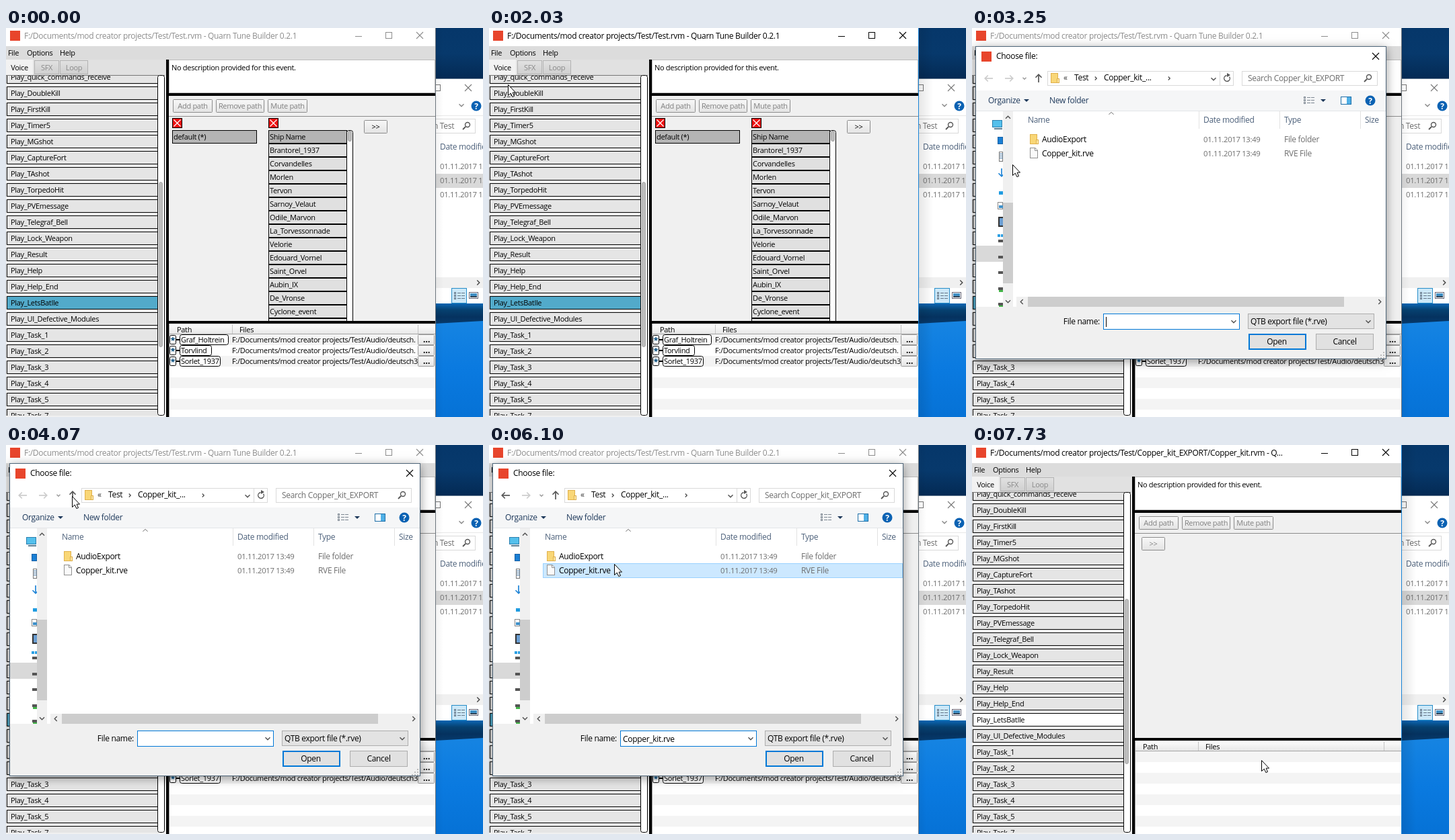
These frames come from a looping animation (709 px wide and 579 px high, 8000 ms). An HTML page with a canvas:

```html
<!DOCTYPE html>
<html lang="en">
<head>
<meta charset="utf-8">
<title>Choose file</title>
<style>
html, body { margin: 0; width: 100%; height: 100%; overflow: hidden; background: #fff; }
canvas { display: block; }
</style>
</head>
<body>
<canvas id="stage" width="709" height="579"></canvas>
<script>
const ctx = document.getElementById('stage').getContext('2d');
const LOOP = 8000;
const FONT = '"Open Sans", "Noto Sans", sans-serif';

// Pointer positions: time, x, y
const POINTER = [
  [200, 446, 513], [400, 398, 440], [610, 286, 308], [810, 150, 176],
  [1020, 60, 90], [1220, 18, 48], [1420, 14, 39], [1830, 28, 84],
  [2040, 46, 142], [2240, 57, 186], [2440, 60, 203], [3460, 66, 168],
  [3660, 82, 116], [3870, 95, 82], [4070, 98, 76], [4480, 128, 106],
  [4690, 170, 158], [4900, 186, 177], [6500, 192, 184], [6720, 250, 260],
  [6920, 344, 380], [7120, 422, 462], [7310, 430, 469]
];
const EVENTS = ['quick_commands_receive', 'DoubleKill', 'FirstKill', 'Timer5', 'MGshot',
  'CaptureFort', 'TAshot', 'TorpedoHit', 'PVEmessage', 'Telegraf_Bell', 'Lock_Weapon',
  'Result', 'Help', 'Help_End', 'LetsBatlle', 'UI_Defective_Modules', 'Task_1', 'Task_2',
  'Task_3', 'Task_4', 'Task_5', 'Task_7'];
const SHIPS = ['Ship Name', 'Brantorel_1937', 'Corvandelles', 'Morlen', 'Tervon',
  'Sarnoy_Velaut', 'Odile_Marvon', 'La_Torvessonnade', 'Velorie', 'Edouard_Vornel',
  'Saint_Orvel', 'Aubin_IX', 'De_Vronse', 'Cyclone_event', 'Cyclone_event'];
const PATHS = [['Graf_Holtrein', 73, '.'], ['Torvlind', 48, '.'], ['Sorlet_1937', 61, '3']];
const ROOT = 'F:/Documents/mod creator projects/Test/';
const KIT = 'Copper_kit';
const APP = 'Quarn Tune Builder';

function rect(x, y, w, h, fill, stroke) {
  if (fill) { ctx.fillStyle = fill; ctx.fillRect(x, y, w, h); }
  if (stroke) {
    ctx.strokeStyle = stroke;
    ctx.lineWidth = 1;
    ctx.strokeRect(x + .5, y + .5, w - 1, h - 1);
  }
}

function round(x, y, w, h, r, fill, stroke) {
  ctx.beginPath();
  ctx.roundRect(x + .5, y + .5, w - 1, h - 1, r);
  if (fill) { ctx.fillStyle = fill; ctx.fill(); }
  if (stroke) { ctx.strokeStyle = stroke; ctx.lineWidth = 1; ctx.stroke(); }
}

function line(points, color, width = 1) {
  ctx.beginPath();
  for (let i = 0; i < points.length; i += 2) ctx.lineTo(points[i], points[i + 1]);
  ctx.strokeStyle = color;
  ctx.lineWidth = width;
  ctx.stroke();
}

function poly(points, fill) {
  ctx.beginPath();
  for (let i = 0; i < points.length; i += 2) ctx.lineTo(points[i], points[i + 1]);
  ctx.closePath();
  ctx.fillStyle = fill;
  ctx.fill();
}

function text(s, x, y, color = '#000', size = 12, align = 'left', weight = 400) {
  ctx.font = `${weight} ${size}px ${FONT}`;
  ctx.letterSpacing = '-0.31px';
  ctx.textAlign = align;
  ctx.fillStyle = color;
  ctx.fillText(s, x, y + 4);
}
const small = (s, x, y, color, align) => text(s, x, y, color, 11, align, 500);
const date = (min, x, y) => text('01.11.2017 13:' + min, x, y, '#6d6d6d', 11.3);

function clip(x, y, w, h, draw) {
  ctx.save();
  ctx.beginPath();
  ctx.rect(x, y, w, h);
  ctx.clip();
  draw();
  ctx.restore();
}

function fade(y0, y1, ...colors) {
  const g = ctx.createLinearGradient(0, y0, 0, y1);
  colors.forEach((c, i) => g.addColorStop(i / (colors.length - 1), c));
  return g;
}

// Chevron pointing along (dx, dy)
function chevron(x, y, dx, dy, color = '#505050', s = 3.5, w = 1.4) {
  const px = dy * s, py = dx * s, hx = dx * s / 2, hy = dy * s / 2;
  line([x - hx - px, y - hy - py, x + hx, y + hy, x - hx + px, y - hy + py], color, w);
}

function cross(x, y, r, color, w = 1.1) {
  line([x - r, y - r, x + r, y + r], color, w);
  line([x - r, y + r, x + r, y - r], color, w);
}

function arrow(x, y, dx, dy, color) {
  line([x - dx * 6, y - dy * 6, x + dx * 5.5, y + dy * 5.5], color, 1.7);
  chevron(x + dx * 3.5, y + dy * 3.5, dx, dy, color, 4.5, 1.7);
}

function lens(x, y) {
  ctx.beginPath();
  ctx.arc(x + 2, y - 2, 3.5, 0, 7);
  ctx.strokeStyle = '#555';
  ctx.lineWidth = 1.4;
  ctx.stroke();
  line([x - 1, y + 1, x - 5, y + 5], '#555', 1.8);
}

function help(x, y) {
  ctx.beginPath();
  ctx.arc(x, y, 7.5, 0, 7);
  ctx.fillStyle = '#0b62b3';
  ctx.fill();
  text('?', x, y + .5, '#fff', 12, 'center', 700);
}

function bars(x, y, color) {
  for (let i = 0; i < 3; i++) {
    rect(x, y + i * 4, 3, 3, null, color);
    rect(x + 5, y + 1 + i * 4, 5, 1, color);
    rect(x + 11, y + 1 + i * 4, 5, 1, color);
  }
}

function drawDesktop(active) {
  rect(638, 0, 71, 75, fade(0, 75, '#06376a', '#07396c', '#042a54'));
  rect(638, 410, 71, 30, fade(410, 440, '#0a66b4', '#06406f', '#05325f', '#063a6c'));
  poly([638, 440, 709, 436, 709, 579, 638, 579], fade(436, 579, '#1684e2', '#0a7ae0', '#0672d6'));
  rect(638, 75, 71, 335, '#fff');
  rect(638, 75, 71, 1, '#6b7f94');
  rect(632, 84, 14, 10, null, '#777');
  cross(687, 89, 5, '#777');
  chevron(677, 115, 0, 1, '#888');
  help(699, 116);
  rect(638, 130, 71, 1, '#e8e8e8');
  rect(630, 135, 68, 22, '#fff', '#d9d9d9');
  text('n Test', 635, 146, '#6d6d6d');
  lens(684, 146);
  text('Date modified', 645, 177, '#4c607a');
  rect(638, 217, 71, 21, '#d9d9d9');
  [206, 227, 248].forEach(y => date('49', 645, y));
  rect(638, 371, 71, 16, '#f0f0f0');
  chevron(702, 379, 1, 0, '#444');
  rect(662, 387, 23, 23, '#cce8f8', '#268dc8');
  bars(666, 393, '#667788');
  rect(688, 393, 14, 10, '#fff', '#667');
  rect(690, 395, 10, 6, '#3f8fc4');
  rect(690, 399, 10, 2, '#345');
  const w = active ? 22 : 12;
  const g = ctx.createLinearGradient(638, 0, 638 + w, 0);
  g.addColorStop(0, active ? 'rgba(0,0,0,.1)' : 'rgba(0,0,0,.05)');
  g.addColorStop(1, 'rgba(0,0,0,0)');
  rect(638, 0, w, 579, g);
  rect(638, 0, 1, 579, active ? '#1883d7' : '#6c757d');
}

function button(s, x, y, w, color = '#808080') {
  round(x, y, w, 20, 1, fade(y, y + 20, '#f8f8f8', '#e3e3e3'), '#8c8c8c');
  small(s, x + w / 2, y + 10, color, 'center');
}

function drawEvents(loaded) {
  clip(0, 71, 238, 506, () => {
    EVENTS.forEach((name, i) => {
      const y = 63 + i * 24;
      const fill = i === 14 ? (loaded ? '#fff' : '#52aaca') : '#e5e5e5';
      rect(1, y, 226, 20, fill, '#000');
      small('Play_' + name, 7, y + 10);
    });
  });
  rect(225, 71, 13, 508, '#f0f0f0');
  round(225, 70, 11, 507, 3, '#fff', '#000');
  round(227, 229, 6, 246, 3, '#bdbdbd', '#a9a9a9');
}

function redCross(x) {
  rect(x, 134, 15, 15, '#e11', '#000');
  cross(x + 7.5, 141.5, 5, '#fff', 1.3);
}

function drawShips() {
  redCross(247);
  redCross(390);
  rect(247, 152, 126, 20, '#b4b4b4', '#000');
  small('default (*)', 249, 162);
  clip(390, 152, 126, 284, () => {
    SHIPS.forEach((name, i) => {
      const y = 152 + i * 20;
      rect(390, y, 117, 20, i ? '#e0e0e0' : '#b4b4b4', '#000');
      small(name, 392, y + 10);
    });
    round(506, 152, 10, 300, 3, '#fff', '#000');
    round(508, 153, 6, 16, 3, '#bdbdbd', '#a0a0a0');
  });
}

function drawPaths(loaded) {
  rect(242, 440, 396, 16, fade(440, 456, '#fff', '#e6e6e6'));
  rect(242, 455, 396, 1, '#a5a5a5');
  [336, 612].forEach(x => rect(x, 441, 1, 14, '#c4c4c4'));
  small('Path', 254, 449);
  small('Files', 347, 449);
  for (let y = 456, i = 0; y < 579; y += 16, i++) rect(242, y, 396, 16, i % 2 ? '#fff' : '#f4f4f4');
  rect(242, 440, 1, 139, '#999');
  if (loaded) return;
  PATHS.forEach(([name, w, end], i) => {
    const y = 456 + i * 16;
    round(243, y + 1, 10, 14, 2, '#fff', '#000');
    text('*', 248, y + 10, '#024a7a', 13, 'center', 700);
    rect(253, y + 7, 5, 2, '#000');
    round(258, y, w, 16, 3, '#fff', '#000');
    small(name, 260, y + 8);
    clip(336, y, 276, 16, () => small(ROOT + 'Audio/deutsch' + end, 336, y + 8));
    round(612, y, 25, 16, 1, fade(y, y + 16, '#fafafa', '#e4e4e4'), '#999');
    text('...', 625, y + 8, '#000', 14, 'center', 600);
  });
}

function drawMain({ active, loaded }) {
  const ink = active ? '#000' : '#8d8d8d';
  rect(0, 0, 638, 579, '#f0f0f0');
  rect(0, 0, 638, 27, '#fff');
  rect(6, 4, 15, 15, '#e8452c');
  text(loaded ? `${ROOT}${KIT}_EXPORT/${KIT}.rvm - Q...` : `${ROOT}Test.rvm - ${APP} 0.2.1`, 27, 12, ink);
  rect(519, 12, 10, 1, ink);
  rect(564, 6, 10, 10, null, ink);
  cross(615, 11, 5, ink);
  rect(0, 27, 638, 20, '#dcdcdc');
  small('File', 3, 37);
  small('Options', 31, 37);
  small('Help', 80, 37);

  rect(0, 47, 238, 24, '#e1e1e1');
  rect(0, 47, 40, 24, '#f2f2f2');
  small('Voice', 20, 59, '#000', 'center');
  [['SFX', 42, 37], ['Loop', 80, 42]].forEach(([s, x, w]) => {
    rect(x, 48, w, 21, fade(48, 69, '#e2e2e2', '#cfcfcf'), '#b2b2b2');
    small(s, x + w / 2, 59, '#8a8a8a', 'center');
  });
  rect(0, 70, 236, 1, '#777');
  drawEvents(loaded);

  rect(242, 47, 396, 50, '#fff', '#bbb');
  small('No description provided for this event.', 246, 59);
  button('Add path', 248, 106, 59);
  button('Remove path', 312, 106, 72);
  button('Mute path', 389, 106, 59);
  rect(242, 131, 396, 1, '#8c8c8c');
  if (loaded) {
    button('>>', 252, 137, 35);
  } else {
    button('>>', 532, 137, 35, '#000');
    drawShips();
  }
  drawPaths(loaded);
  rect(238, 47, 4, 532, '#000');
  rect(242, 97, 396, 4, '#000');
  rect(242, 436, 396, 4, '#000');
}

function folder(x, y) {
  rect(x, y + 1, 11, 15, '#f9d777', '#e0b04b');
  rect(x + 9, y + 9, 4, 7, '#ffe9a6', '#dcae4c');
}

function page(x, y) {
  poly([x, y, x + 8, y, x + 12, y + 4, x + 12, y + 16, x, y + 16], '#909090');
  poly([x + 1, y + 1, x + 8, y + 1, x + 11, y + 4, x + 11, y + 15, x + 1, y + 15], '#fafafa');
  line([x + 7.5, y, x + 7.5, y + 4.5, x + 12, y + 4.5], '#909090');
}

function drawTree() {
  rect(6, 324, 40, 24, '#d9d9d9');
  rect(30, 137, 15, 11, '#54c0ec', '#2b7fae');
  rect(33, 149, 12, 2, '#5c7f95');
  rect(38, 162, 8, 11, '#1a7fd4', '#1560a5');
  rect(40, 184, 6, 15, '#fff', '#777');
  [187, 190, 193].forEach(y => rect(41, y, 5, 1, '#4a7ba8'));
  arrow(44, 215, 0, 1, '#1f84d6');
  rect(40, 243, 6, 5, '#1f9ce0');
  rect(38, 259, 8, 11, '#fff', '#888');
  rect(40, 264, 6, 4, '#3e8fc8');
  rect(39, 281, 7, 15, '#333');
  rect(41, 283, 5, 11, '#6b9ed2');
  rect(38, 307, 4, 4, '#2b9fe3');
  rect(43, 307, 3, 4, '#2b9fe3');
  [315, 339, 362, 386, 409].forEach((y, i) => {
    rect(39, y, 7, 4, '#555');
    if (i > 2) rect(40, y + 4, 6, 3, '#44b649');
  });
  rect(46, 124, 15, 291, '#f0f0f0');
  rect(46, 260, 15, 120, '#cdcdcd');
  chevron(53.5, 133, 0, -1);
  chevron(53.5, 407, 0, 1);
}

function drawNav(inTest, visited) {
  arrow(25, 75, -1, 0, visited ? '#555' : '#ccc');
  arrow(55, 75, 1, 0, '#ccc');
  chevron(78, 75, 0, 1, '#999', 2.5);
  arrow(99, 75, 0, -1, '#555');
  rect(112, 64, 277, 22, '#fff', '#d9d9d9');
  rect(368, 65, 1, 20, '#d9d9d9');
  folder(117, 66);
  text('«', 136, 74, '#333');
  const crumbs = inTest
    ? [['mod creator proj...', 151, 260], ['Test', 272, 304]]
    : [['Test', 152, 184], [KIT + '_...', 196, 293]];
  crumbs.forEach(([s, x, sep]) => {
    text(s, x, 74);
    chevron(sep, 75, 1, 0, '#444', 2.5, 1.2);
  });
  chevron(359, 76, 0, 1);
  ctx.beginPath();
  ctx.arc(379, 75, 4.3, -.6, 4.6);
  ctx.strokeStyle = '#555';
  ctx.lineWidth = 1.4;
  ctx.stroke();
  poly([379, 67, 384, 70, 379, 73], '#555');
  rect(401, 64, 202, 22, '#fff', '#d9d9d9');
  text('Search ' + (inTest ? 'Test' : KIT + '_EXPORT'), 410, 75, '#6d6d6d');
  lens(588, 75);
}

function drawFiles(inTest, row) {
  if (row) rect(80, 176, 535, 22, row[0], row[1]);
  const files = inTest
    ? [['Audio', '43', 1], [KIT + '_EXPORT', '54', 1]]
    : [['AudioExport', '49', 1], [KIT + '.rve', '49', 0]];
  files.forEach(([name, min, isFolder], i) => {
    const y = 166 + i * 21;
    (isFolder ? folder : page)(86, y - 9);
    text(name, 104, y);
    date(min, 344, y);
    text(isFolder ? 'File folder' : 'RVE File', 464, y, '#6d6d6d');
  });
}

function drawDialog({ inTest, visited, row, named, caret, pressed, listed }) {
  ctx.save();
  ctx.shadowColor = 'rgba(0,0,0,.4)';
  ctx.shadowBlur = 14;
  ctx.shadowOffsetY = 3;
  rect(5, 27, 611, 466, '#fff');
  ctx.restore();
  rect(5, 27, 611, 466, null, '#4d6478');
  rect(14, 35, 15, 15, '#e8452c');
  text('Choose file:', 36, 42);
  cross(600, 42, 5, '#000');
  drawNav(inTest, visited);

  rect(6, 93, 609, 31, '#f5f6f7');
  rect(6, 123, 609, 1, '#e3e5e8');
  text('Organize', 24, 108, '#1e395b');
  poly([77, 106, 85, 106, 81, 110], '#1e395b');
  text('New folder', 115, 108, '#1e395b');
  bars(493, 102, '#7d8792');
  poly([518, 106, 526, 106, 522, 110], '#1e395b');
  rect(548, 102, 16, 12, '#fff', '#1d6ea8');
  rect(557, 103, 6, 10, '#4fb0e6');
  help(592, 108);

  drawTree();
  chevron(207, 127, 0, -1, '#666', 3.5, 1);
  [['Name', 83], ['Date modified', 344], ['Type', 464], ['Size', 584]]
    .forEach(([s, x]) => text(s, x, 137, '#4c607a'));
  [337, 457, 577].forEach(x => rect(x, 124, 1, 26, '#e2e2e2'));
  if (listed) drawFiles(inTest, row);
  rect(66, 400, 549, 15, '#f0f0f0');
  rect(83, 400, 470, 15, '#cdcdcd');
  chevron(74, 407.5, -1, 0);
  chevron(606, 407.5, 1, 0);

  rect(6, 415, 609, 77, '#f0f0f0');
  text('File name:', 190, 437, '#000', 12, 'right');
  rect(195, 425, 203, 24, '#fff', '#0078d7');
  if (named) text(KIT + '.rve', 199, 438);
  if (caret) rect(199, 430, 1, 15, '#000');
  chevron(389, 437, 0, 1);
  rect(410, 425, 188, 23, '#e3e3e3', '#adadad');
  text('QTB export file (*.rve)', 414, 437);
  chevron(589, 437, 0, 1);
  rect(411, 455, 86, 24, pressed ? '#cce4f7' : '#e1e1e1', pressed ? '#005499' : '#0078d7');
  if (!pressed) rect(412, 456, 84, 22, null, '#0078d7');
  text('Open', 453, 467, '#000', 12, 'center');
  rect(511, 455, 86, 24, '#e1e1e1', '#adadad');
  text('Cancel', 554, 467, '#000', 12, 'center');
  for (let i = 0; i < 3; i++)
    for (let j = 0; j <= i; j++) rect(611 - j * 4, 482 + i * 4, 2, 2, '#bbb');
}

function drawPointer(x, y) {
  ctx.save();
  ctx.translate(x + .5, y + .5);
  ctx.beginPath();
  const shape = [0, 0, 0, 16, 3.8, 12.6, 6.3, 18, 9, 17, 6.6, 11.6, 11, 11.6];
  for (let i = 0; i < shape.length; i += 2) ctx.lineTo(shape[i], shape[i + 1]);
  ctx.closePath();
  ctx.fillStyle = '#fff';
  ctx.fill();
  ctx.strokeStyle = '#000';
  ctx.lineWidth = 1;
  ctx.stroke();
  ctx.restore();
}

function rowStyle(t) {
  if (t < 4690) return null;
  if (t < 4900) return ['#e5f3ff'];
  if (t < 5500) return ['#cce8ff', '#99d1ff'];
  if (t < 5900) return ['#e5f3ff'];
  if (t < 6720) return ['#cce8ff', '#99d1ff'];
  return t < 7310 ? ['#cce8ff'] : ['#d9d9d9'];
}

function draw(t) {
  const active = (t >= 1630 && t < 2840) || t >= 7520;
  drawDesktop(active);
  drawMain({ active, loaded: t >= 7730 });
  if (t >= 3050 && t < 7520) {
    drawDialog({
      inTest: t >= 4280 && t < 5500,
      visited: t >= 4280,
      row: rowStyle(t),
      named: t >= 5900,
      caret: t < 4900 && Math.floor((t - 3250) / 530) % 2 === 0,
      pressed: t >= 7310,
      listed: t >= 3250
    });
  }
  const at = POINTER.filter(p => p[0] <= t).pop();
  if (at) drawPointer(at[1], at[2]);
}

const start = performance.now();
function tick() {
  draw((performance.now() - start) % LOOP);
  requestAnimationFrame(tick);
}
tick();
</script>
</body>
</html>
```
